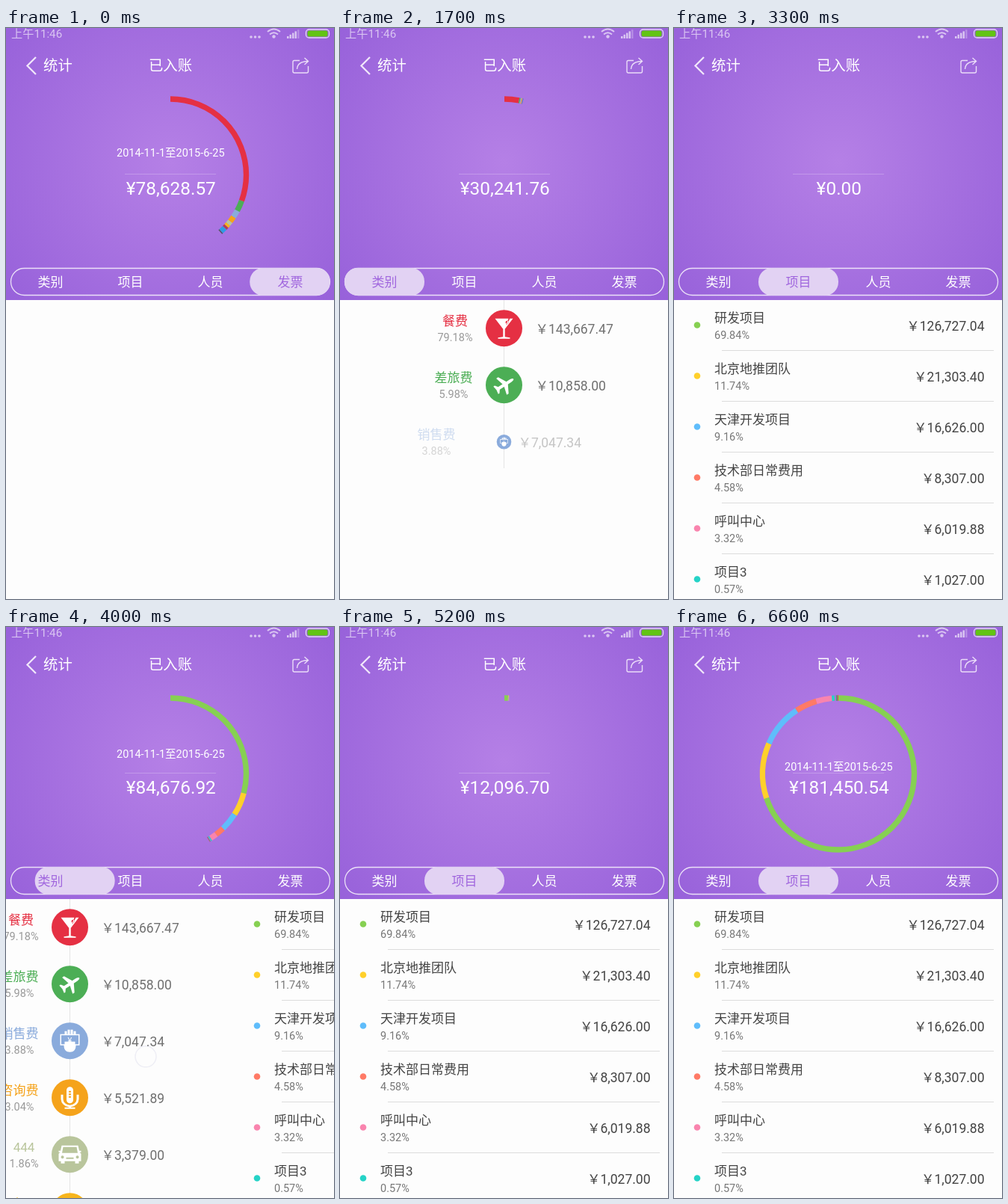
An HTML page with a canvas for the animation above (7.3 s loop, 439 px wide and 764 px high).

```html
<!DOCTYPE html>
<html lang="zh-CN">
<head>
<meta charset="utf-8">
<title>统计</title>
<style>
  html, body { margin: 0; width: 100%; height: 100%; overflow: hidden; background: #fdfdfd; }
  canvas { display: block; }
</style>
</head>
<body>
<canvas id="stage" width="439" height="764"></canvas>
<script>
const ctx = document.getElementById('stage').getContext('2d');
const W = 439, H = 764, HEADER = 364, LOOP = 7300, STEP = 100, LAST = 6600;
const TOTAL = 181450.54, RUN = 1500, TAB_W = 107;
const FONT = 'Roboto, "Noto Sans CJK SC", "Noto Sans CJK", sans-serif';
const TABS = ['类别', '项目', '人员', '发票'];

// name, percent, amount, colour
const categories = [
  ['餐费', 79.18, '143,667.47', '#e53043'],
  ['差旅费', 5.98, '10,858.00', '#4cae55'],
  ['销售费', 3.88, '7,047.34', '#8aabdc'],
  ['咨询费', 3.04, '5,521.89', '#f5a31b'],
  ['444', 1.86, '3,379.00', '#b9c59c'],
  ['交通', 1.40, '2,540.31', '#f7b51c'],
  ['', 1.40, '', '#b0405a'],
  ['', 2.60, '', '#2f9be5'],
  ['', 0.66, '', '#555566']
];
const projects = [
  ['研发项目', 69.84, '126,727.04', '#86d052'],
  ['北京地推团队', 11.74, '21,303.40', '#ffd02b'],
  ['天津开发项目', 9.16, '16,626.00', '#5fbdfb'],
  ['技术部日常费用', 4.58, '8,307.00', '#ff7a66'],
  ['呼叫中心', 3.32, '6,019.88', '#f984ae'],
  ['项目3', 0.57, '1,027.00', '#25d3c7'],
  ['', 0.30, '', '#b36fd8'],
  ['', 0.30, '', '#3fae6a'],
  ['', 0.19, '', '#e0405a']
];
const invoices = [
  ['发票', 92.8, '168,385.58', '#86d052'],
  ['非发票', 7.2, '13,064.96', '#ffd02b']
];

const icons = [
  'M-12-13H12L1.200 1V11.500L8 12.500V14H-8V12.500L-1.200 11.500V1ZM4-10a2 2 0 1 0 .1 0ZM6-13L8-13 4-5 3-5Z',
  'M0-15C1.500-15 2-12 2-10V-5L13 1V4L2 1V8L6 11V13L0 12-6 13V11L-2 8V1L-13 4V1L-2-5V-10C-2-12-1.500-15 0-15Z',
  'M-13-9H13V6H8C8 12 5 15 0 15S-8 12-8 6H-13ZM-11.500-7.500V4.500H-7V1H7V4.500H11.500V-7.500ZM-7-13h3v4h-3ZM-3-15h3v6h-3ZM1-15h3v6h-3ZM5-13h3v4h-3Z',
  'M-4.500-10a4.500 4.500 0 0 1 9 0V3a4.500 4.500 0 0 1-9 0ZM-1.500-9v2h3v-2ZM-1.500-5.500v2h3v-2ZM-1.500-2v2h3v-2ZM-12-4h3v6a9 8 0 0 0 18 0v-6h3v6a12 11 0 0 1-10.500 10.500V13H7v2H-7v-2h5.500v-.5A12 11 0 0 1-12 2Z',
  'M-11-12H11L12.500-5H15V-3H13L15-1V9H12V12H7V9H-7V12H-12V9H-15V-1L-13-3H-15V-5H-12.500ZM-9-10L-10.500-2H10.500L9-10ZM-10 1.500a2 2 0 1 0 .1 0ZM10 1.500a2 2 0 1 0 .1 0ZM-5 4V6H5V4Z',
  'M-10-14H10V12H-10ZM-7-11V0H7V-11Z'
].map(d => new Path2D(d));
const wallet = 2, plane = 1;

// start, data, delay of the ring behind the counter
const runs = [
  [-650, categories, 10], [150, invoices, 0], [1450, categories, 60],
  [3300, projects, 30], [4400, categories, 5], [5100, projects, 0]
];
// time, scroll position of the pager
const scrollKeys = [
  [0, 1314], [100, 1317], [1150, 1317], [1300, 500], [1450, 0], [2700, 0], [2800, 60], [2900, 170],
  [3000, 330], [3100, 415], [3200, 439], [3700, 439], [3800, 390], [3900, 280], [4000, 134],
  [4100, 50], [4200, 14], [4300, 0], [4600, 0], [4700, 80], [4800, 210], [4900, 345], [5000, 420], [5100, 439]
];
const selections = [[0, 3], [1200, 0], [3000, 1], [3950, 0], [4850, 1]];
// from, to, start point, end point
const touches = [
  [700, 1250, 28, 348, 28, 348], [2700, 3000, 330, 590, 90, 610],
  [3650, 4020, 30, 590, 196, 574], [4600, 4850, 185, 605, -20, 640]
];

const clamp = v => Math.max(0, Math.min(1, v));
const latest = (list, t) => list.filter(item => item[0] <= t).pop();

function scrollAt(t) {
  const i = scrollKeys.findIndex(k => k[0] > t);
  if (i < 0) return W;
  const [t0, x0] = scrollKeys[i - 1], [t1, x1] = scrollKeys[i];
  return x0 + (x1 - x0) * (t - t0) / (t1 - t0);
}

function text(str, x, y, size, color, align = 'left') {
  ctx.font = `${size}px ${FONT}`;
  ctx.fillStyle = color;
  ctx.textAlign = align;
  ctx.fillText(str, x, y);
}

function disc(x, y, r, color) {
  ctx.fillStyle = color;
  ctx.beginPath();
  ctx.arc(x, y, r, 0, 7);
  ctx.fill();
}

function outline(d, color, width) {
  ctx.strokeStyle = color;
  ctx.lineWidth = width;
  ctx.stroke(new Path2D(d));
}

function bar(x, y, w, h, color) {
  ctx.fillStyle = color;
  ctx.fillRect(x, y, w, h);
}

function capsule(x, y, w, h, r) {
  ctx.beginPath();
  ctx.roundRect(x, y, w, h, r);
}

function categoryPage(t) {
  bar(219, HEADER, 1, 400 * clamp((t - 1250) / 800), '#e4e4e4');
  categories.slice(0, 6).forEach(([name, percent, amount, color], i) => {
    const q = clamp((t - 1300 - 150 * i) / 250), y = 402 + 76 * i;
    if (!q) return;
    const share = percent.toFixed(2) + '%', slide = -64 * (1 - q) ** 2;
    ctx.font = `17px ${FONT}`;
    const nameW = ctx.measureText(name).width;
    ctx.font = `14.5px ${FONT}`;
    const center = 177.5 - Math.max(nameW, ctx.measureText(share).width) / 2 + slide;
    ctx.globalAlpha = q;
    text(name, center, y - 4, 17, color, 'center');
    text(share, center, y + 17, 14.5, '#999', 'center');
    text('￥' + amount, 261.5 + slide, y + 7, 17.5, '#707070');
    ctx.globalAlpha = 1;
    ctx.save();
    ctx.translate(219.5, y - 0.3);
    ctx.scale(q, q);
    disc(0, 0, 24.5, color);
    if (i === wallet) text('¥', 0, 3, 11, '#fff', 'center');
    if (i === plane) ctx.rotate(1);
    ctx.fillStyle = '#fff';
    ctx.fill(icons[i], 'evenodd');
    ctx.restore();
  });
}

function listPage(rows) {
  rows.filter(row => row[0]).forEach(([name, percent, amount, color], i) => {
    const y = 68 * i;
    disc(31, 397.5 + y, 4.3, color);
    text(name, 54, 394 + y, 17, '#444');
    text(percent.toFixed(2) + '%', 54, 415.5 + y, 14.5, '#777');
    text('￥' + amount, 415.5, 404.5 + y, 17.5, '#444', 'right');
    bar(64, 431 + y, 364, 1, '#dcdcdc');
  });
}

function pages(t, scroll) {
  const draw = [() => categoryPage(t), () => listPage(projects), null, () => t >= 200 && listPage(invoices)];
  draw.forEach((page, i) => {
    const x = W * i - scroll;
    if (!page || Math.abs(x) >= W) return;
    ctx.save();
    ctx.translate(x, 0);
    page();
    ctx.restore();
  });
}

function statusBar() {
  const pale = 'rgba(255,255,255,.62)';
  text('上午11:46', 7, 13, 15.2, pale);
  for (const x of [328, 333.5, 339]) disc(x, 12, 1.8, pale);
  outline('M350 5Q358.500-2 367 5M353 8.500Q358.500 4 364 8.500', pale, 2);
  disc(358.5, 11.5, 2.2, pale);
  for (let i = 0; i < 5; i++) bar(376 + i * 3.5, 11 - i * 2.2, 2.5, 3 + i * 2.2, i < 4 ? pale : 'rgba(255,255,255,.25)');
  capsule(401.5, 2, 31, 11, 4);
  ctx.strokeStyle = 'rgba(255,255,255,.75)';
  ctx.lineWidth = 1.3;
  ctx.stroke();
  capsule(403.5, 3.5, 27, 8, 2.5);
  ctx.fillStyle = '#62c414';
  ctx.fill();
}

function header(scroll, selected) {
  const glow = ctx.createRadialGradient(220, 180, 0, 220, 180, 290);
  glow.addColorStop(0, '#b580e6');
  glow.addColorStop(1, '#9761da');
  bar(0, 0, W, HEADER, glow);
  statusBar();
  outline('M40 39L28.500 50.500 40 62', '#f0e6fa', 2.3);
  text('统计', 50, 57, 19.4, '#fff');
  text('已入账', 220, 57, 19.4, '#fff', 'center');
  outline('M393 43.500H386Q384 43.500 384 45.500V58Q384 60 386 60H402.500Q404.500 60 404.500 58V51M389.500 55Q390 45 404 44.500M399.500 40L404.500 44.500 399.500 49', '#eadcf8', 1.4);

  capsule(6.5, 321.5, 427, 36, 18);
  ctx.strokeStyle = 'rgba(255,255,255,.8)';
  ctx.lineWidth = 1.3;
  ctx.stroke();
  capsule(6 + TAB_W * scroll / W, 321, TAB_W, 37, 18);
  ctx.fillStyle = '#e2d2f3';
  ctx.fill();
  TABS.forEach((tab, i) => text(tab, 59.5 + TAB_W * i, 346, 17, i === selected ? '#a066de' : '#fff', 'center'));
}

function ring(t) {
  const [start, data, delay] = latest(runs, t);
  const count = clamp((t - start) / RUN);
  const p = clamp((t - start - delay) / RUN);
  const sweep = (1 - Math.cos(Math.PI * p)) * Math.PI;
  let angle = -Math.PI / 2;
  ctx.lineWidth = 7.4;
  for (const [, percent, , color] of data) {
    const next = angle + sweep * percent / 100;
    ctx.strokeStyle = color;
    ctx.beginPath();
    ctx.arc(220, 196.5, 101.5, angle, next);
    ctx.stroke();
    angle = next;
  }
  bar(159, 195, 122, 1, 'rgba(255,255,255,.22)');
  const amount = (TOTAL * count).toLocaleString('en-US', { minimumFractionDigits: 2, maximumFractionDigits: 2 });
  text('¥' + amount, 220.8, 223, 24.4, '#fff', 'center');
  const q = clamp((p - 0.3) / 0.5);
  ctx.globalAlpha = clamp(q * 4);
  text('2014-11-1至2015-6-25', 220.3, 192 - 35 * (1 - q) ** 2, 14.5, '#fff', 'center');
  ctx.globalAlpha = 1;
}

function touch(t) {
  const hit = touches.find(([from, to]) => t >= from && t < to);
  if (!hit) return;
  const [from, to, x0, y0, x1, y1] = hit, k = (t - from) / (to - from);
  const x = x0 + (x1 - x0) * k, y = y0 + (y1 - y0) * k;
  ctx.globalAlpha = clamp((to - t) / 60);
  disc(x, y, 14, 'rgba(255,255,255,.4)');
  ctx.strokeStyle = 'rgba(190,190,220,.7)';
  ctx.lineWidth = 1.5;
  ctx.stroke();
  ctx.globalAlpha = 1;
}

function frame() {
  const t = Math.min(LAST, Math.floor(performance.now() % LOOP / STEP) * STEP);
  const scroll = scrollAt(t);
  bar(0, 0, W, H, '#fdfdfd');
  pages(t, scroll);
  header(scroll, latest(selections, t)[1]);
  ring(t);
  touch(t);
  requestAnimationFrame(frame);
}
frame();
</script>
</body>
</html>
```
